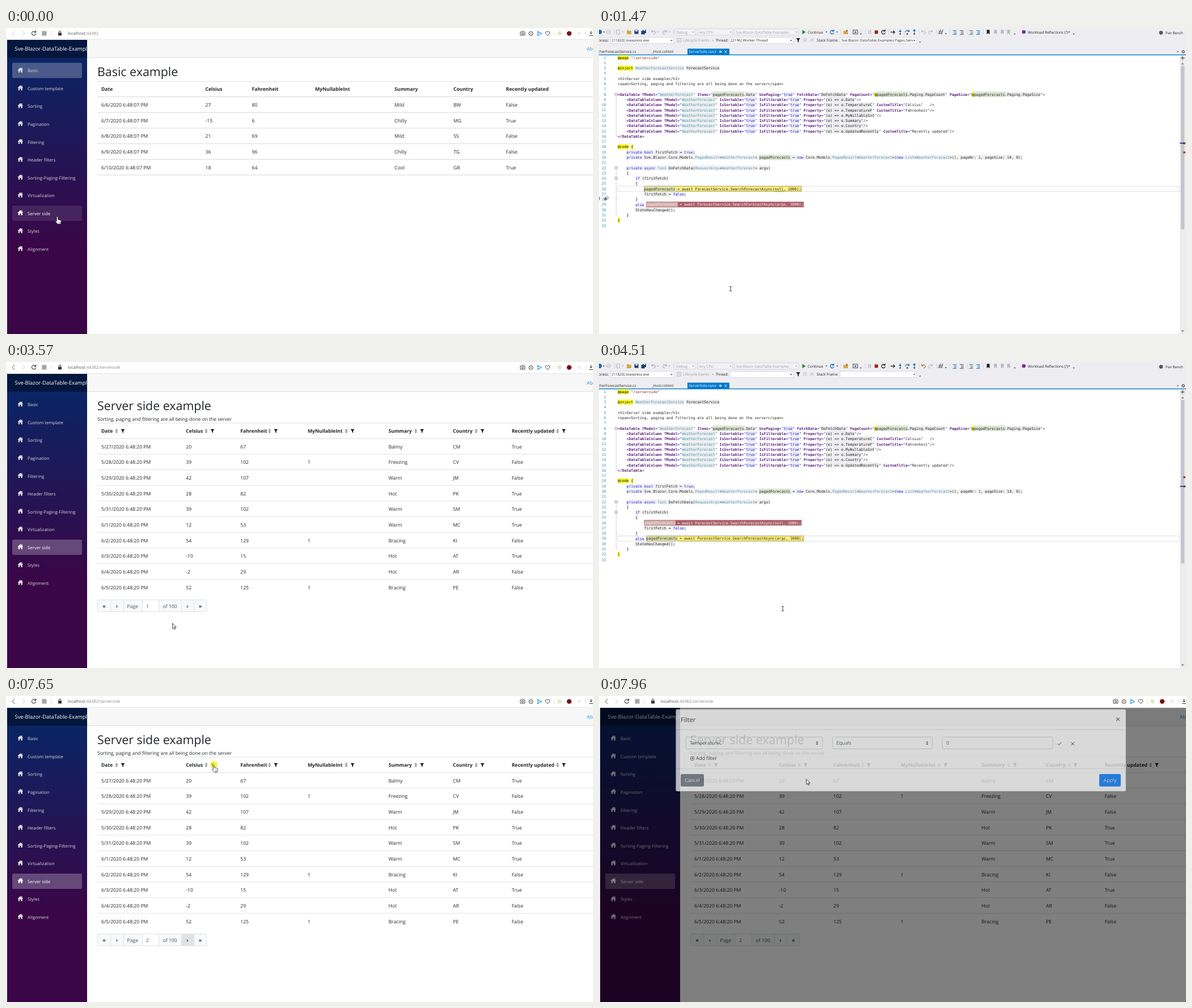
Write an HTML page that moves like this. It is 1035 by 541 pixels and loops after 8 s.

```html
<!DOCTYPE html>
<html lang="en">
<head>
<meta charset="utf-8">
<title>Server side data table</title>
<style>
html, body { margin: 0; width: 100%; height: 100%; overflow: hidden; background: #fff; }
svg { display: block; width: 100vw; height: 100vh; }
text { font-family: "Open Sans", "Noto Sans", sans-serif; white-space: pre; text-rendering: geometricPrecision; }
.mono { font-family: "DejaVu Sans Mono", "Noto Sans Mono", monospace; }
.line { fill: none; stroke-linecap: round; stroke-linejoin: round; }
</style>
</head>
<body>
<svg id="stage" viewBox="0 0 1035 541" preserveAspectRatio="none"></svg>
<script>
const LOOP = 8000;
const INK = '#212529';
const range = n => [...Array(n).keys()];

// Drawing helpers; text is placed by its left edge and the middle of its capitals.
const text = (x, y, s, size = 8.6, fill = INK, extra = '') =>
  `<text x="${x}" y="${y + size * .36}" font-size="${size}" fill="${fill}" ${extra}>${s}</text>`;
const rect = (x, y, w, h, fill, extra = '') =>
  `<rect x="${x}" y="${y}" width="${w}" height="${h}" fill="${fill}" ${extra}/>`;
const dot = (x, y, r, fill, extra = '') => `<circle cx="${x}" cy="${y}" r="${r}" fill="${fill}" ${extra}/>`;
const shape = (d, fill, extra = '') => `<path d="${d}" fill="${fill}" ${extra}/>`;
const line = (d, stroke = '#333', width = 1) =>
  `<path class="line" d="${d}" stroke="${stroke}" stroke-width="${width}"/>`;
const when = (spans, body) => `<g data-on="${spans}">${body}</g>`;
const escape = s => s.replace(/&/g, '&amp;').replace(/</g, '&lt;').replace(/>/g, '&gt;');
const caretDown = (x, y, fill = '#444') => shape(`M${x - 1.7} ${y - .8}h3.4l-1.7 2z`, fill);

// ---------- Browser ----------
const BASIC = '0-620';
const SERVER = '2800-4200 6380-8000';

function browserBar() {
  const back = 'M15 5.5l-4 4 4 4';
  return rect(0, 0, 1035, 21, '#fff') + rect(0, 20, 1035, 1, '#e3e5e8') +
    when(BASIC, line(back, '#c4c4c4')) + when(SERVER, line(back, '#444')) +
    line('M29 5.5l4 4-4 4', '#c4c4c4') +
    line('M52 7.2a3.6 3.6 0 1 0 .6 3M52.6 5v2.6h-2.7', '#333', 1.1) +
    [[64, 6], [68, 6], [64, 10], [68, 10]].map(([x, y]) => rect(x, y, 2.8, 2.8, 'none', 'stroke="#555" stroke-width=".8"')).join('') +
    rect(79.5, 5, 1, 9, '#ddd') + rect(92, 8.5, 6, 4.8, '#333') + line('M93.3 8.5v-1.5a1.7 1.7 0 0 1 3.4 0v1.5', '#333') +
    when(BASIC, text(109, 9.8, 'localhost<tspan fill="#888">:44382</tspan>', 7.4, '#555')) +
    when(SERVER, text(109, 9.8, 'localhost<tspan fill="#888">:44382/serverside</tspan>', 7.4, '#555')) +
    line('M907.3 7h2l.8-1.3h2l.8 1.3h2v5.8h-7.6z', '#444') + dot(911, 9.8, 1.5, 'none', 'stroke="#444"') +
    dot(925.5, 9.8, 3.6, 'none', 'stroke="#444"') + line('M924.2 8.5l2.6 2.6m0-2.6l-2.6 2.6', '#444', .8) +
    line('M937 6l7.5 3.7-7.5 3.7 1.4-3.7z', '#2196e8', 1.1) +
    line('M955 13.3l-3.5-3.6a2 2 0 0 1 3.5-2.5 2 2 0 0 1 3.5 2.5z', '#444') +
    rect(966, 5, 1, 9, '#e2e2e2') + dot(976, 9.6, 3.8, '#d9efc8') + dot(993, 9.6, 4.2, '#7d0d1a') +
    dot(1011, 9.6, 3.2, '#eeeeee') + rect(1022, 5, 1, 9, '#e2e2e2') +
    line('M1031.5 5.5v5m-2-2l2 2 2-2M1028.5 13.3h7', '#333');
}

const NAV = ['Basic', 'Custom template', 'Sorting', 'Pagination', 'Filtering', 'Header filters',
  'Sorting-Paging-Filtering', 'Virtualization', 'Server side', 'Styles', 'Alignment'];
const NAV_STEP = 31.55;

function sidebar() {
  const mark = (row, alpha) => rect(11, 61.5 + row * NAV_STEP, 123, 27, '#fff', `fill-opacity="${alpha}" rx="2.2"`);
  const items = NAV.map((label, i) => {
    const y = 75.3 + i * NAV_STEP;
    const color = label === 'Server side' ? '#fff' : '#d7d7d7';
    return shape(`M20.3 ${y - .8}l5-4.8 2 1.9v-1.4h1.4v2.7l1.6 1.6h-1.4v4.2h-2.4v-3h-2.3v3h-2.4v-4.2z`, color) +
      text(38, y + .2, label, 7.8, color);
  }).join('');
  return rect(0, 21, 2, 520, '#eceef2') + rect(2, 21, 141, 520, 'url(#night)') +
    rect(2, 21, 141, 31.5, '#000', 'fill-opacity=".4"') +
    `<g clip-path="url(#side)">${text(15.5, 37, 'Sve-Blazor-DataTable-Examples', 9.4, '#fff')}</g>` +
    when(BASIC, mark(0, .25) + mark(8, .1)) + when(SERVER, mark(8, .25)) + items;
}

const rule = (y, color, h = 1) => rect(161, y, 874, h, color);
const cells = (xs, y, values) => values.map((v, i) => v === '-' ? '' : text(xs[i], y, v)).join('');
const bold = (x, y, s) => text(x, y, s, 8.6, INK, 'font-weight="700"');
const HEADS = ['Date', 'Celsius', 'Fahrenheit', 'MyNullableInt', 'Summary', 'Country', 'Recently updated'];
const title = s => text(161, 77.3, s, 21.4, INK, 'font-weight="500"');
const ROW = 27.65;

function basicPage() {
  const xs = [168, 351.5, 433.5, 545, 685, 789, 881.5];
  const rows = ['6/6 27 80 - Mild BW False', '6/7 -15 6 - Chilly MG True', '6/8 21 69 - Mild SS False',
    '6/9 36 96 - Chilly TG False', '6/10 18 64 - Cool GR True'];
  return title('Basic example') + rule(94, '#dee2e6') + HEADS.map((h, i) => bold(xs[i], 108, h)).join('') +
    rows.map((r, i) => {
      const [day, ...rest] = r.split(' ');
      return rule(121.2 + i * ROW, '#d3d8dd') + cells(xs, 136 + i * ROW, [`${day}/2020 6:48:07 PM`, ...rest]);
    }).join('') + rule(259.4, '#d3d8dd');
}

function serverPage() {
  const xs = [168, 317.3, 413.3, 532, 674.5, 788, 891.7];
  const sortXs = [195, 353, 464.7, 600, 722.5, 829, 972.5];
  const rows = ['5/27 20 67 - Balmy CM True', '5/28 39 102 1 Freezing CV False', '5/29 42 107 - Warm JM False',
    '5/30 28 82 - Hot PK True', '5/31 39 102 - Warm SM True', '6/1 12 53 - Warm MC True',
    '6/2 54 129 1 Bracing KI False', '6/3 -10 15 - Hot AT True', '6/4 -2 29 - Hot AR False', '6/5 52 125 1 Bracing PE False'];
  const heads = HEADS.map((h, i) => {
    const x = sortXs[i];
    return bold(xs[i], 121.8, h) +
      shape(`M${x - 2.6} 121.2h5.2l-2.6-2.8zM${x - 2.6} 122.8h5.2l-2.6 2.8z`, '#777') +
      shape(`M${x + 7.5} 118.8h7l-2.6 3.2v3.6l-1.8-1.3v-2.3z`, '#111');
  }).join('');
  return title('Server side example') + text(161, 101.2, 'Sorting, paging and filtering are all being done on the server', 8.5) +
    rule(107.5, '#dee2e6') + heads +
    rows.map((r, i) => {
      const [day, ...rest] = r.split(' ');
      return rule(134.8 + i * ROW, '#dee2e6', i ? 1 : 1.2) + cells(xs, 149.6 + i * ROW, [`${day}/2020 6:48:20 PM`, ...rest]);
    }).join('') + pager();
}

function pager() {
  const edges = [184, 207, 240, 269, 309, 331];
  const pick = (x, s) => text(x, 431.6, s, 10, INK, 'text-anchor="middle" font-weight="600"');
  return rect(161.5, 420.5, 192, 21, '#f8f9fa', 'stroke="#dee2e6" rx="2"') + rect(240, 421, 29, 20, '#fff') +
    when('3880-4200 6380-7730', rect(309, 421, 22, 20, '#dfe3e8')) +
    edges.map(x => rect(x, 421, 1, 20, '#dee2e6')).join('') +
    pick(173, '«') + pick(195.5, '‹') + pick(320, '›') + pick(342.5, '»') +
    text(213.5, 431.8, 'Page', 8.6, '#495057') + text(276.5, 431.8, 'of 100', 8.6, '#495057') +
    when('2800-4200', text(247, 431.8, '1', 8.6, '#495057')) + when('6380-8000', text(247, 431.8, '2', 8.6, '#495057'));
}

function modal() {
  const field = (x, w, s, select) => rect(x, 72.5, w, 21, '#fff', 'stroke="#ced4da" rx="2"') +
    text(x + 7, 83.3, s, 8.6, '#495057') +
    (select ? shape(`M${x + w - 11.5} 82.5h4l-2-2.4zM${x + w - 11.5} 84h4l-2 2.4z`, '#343a40') : '');
  const button = (x, w, s, fill) => rect(x, 138, w, 22, fill, 'rx="2.2"') +
    text(x + w / 2, 149.2, s, 8.6, '#fff', 'text-anchor="middle"');
  return rect(135.5, 23.5, 793.5, 145, '#fff', 'stroke="#888" stroke-opacity=".4" rx="2.5"') +
    text(144, 41.5, 'Filter', 11.2, INK, 'font-weight="500"') + line('M912.7 38.6l4.6 4.6m0-4.6l-4.6 4.6', '#555', 1.3) +
    rect(136, 59, 793, 1, '#dee2e6') + rect(136, 128, 793, 1, '#dee2e6') +
    field(153, 241, 'TemperatureC', true) + field(411.5, 176.5, 'Equals', true) + field(605.5, 194.5, '0') +
    line('M809 84.5l2 2 4.2-4.5', '#222') + line('M832.7 82l5 5m0-5l-5 5', '#222') +
    dot(164.5, 110.5, 3.4, 'none', 'stroke="#333" stroke-width=".8"') + line('M163 110.5h3m-1.5-1.5v3', '#333', .8) +
    text(171, 109.8, 'Add filter') + button(144, 41, 'Cancel', '#6c757d') + button(882, 38, 'Apply', '#007bff');
}

const browser = () => rect(0, 0, 1035, 541, '#fff') + sidebar() +
  rect(143, 21, 892, 31.5, '#f7f7f7') + rect(143, 51.8, 892, .8, '#d6d5d5') + text(1024, 37, 'About', 8.6, '#2b8fe0') +
  when(BASIC, basicPage()) + when(SERVER, serverPage()) +
  rect(2, 21, 1033, 520, '#000', 'id="backdrop"') + `<g id="modal">${modal()}</g>` + browserBar();

// ---------- Code editor ----------
const CHAR = 3.902, LEFT = 33, LEADING = 9.28;
const column = c => LEFT + c * CHAR;
const rowY = n => 52.3 + (n - 1) * LEADING;
const STOPPED = '1160-2410 4590-6080';

const col = (property, rest = '') =>
  `    <DataTableColumn TModel="WeatherForecast" IsSortable="true" IsFilterable="true" Property="(e) => e.${property}"${rest}/>`;
const CODE = `@page "/serverside"

@inject WeatherForecastService ForecastService

<h1>Server side example</h1>
<span>Sorting, paging and filtering are all being done on the server</span>

<DataTable TModel="WeatherForecast" Items="pagedForecasts.Data" UsePaging="true" FetchData="DoFetchData" PageCount="@pagedForecasts.Paging.PageCount" PageSize="@pagedForecasts.Paging.PageSize">
${col('Date')}
${col('TemperatureC', ' CustomTitle="Celsius"   ')}
${col('TemperatureF', ' CustomTitle="Fahrenheit"')}
${col('MyNullableInt')}
${col('Summary')}
${col('Country')}
${col('UpdatedRecently', ' CustomTitle="Recently updated"')}
</DataTable>

@code {
    private bool firstFetch = true;
    private Sve.Blazor.Core.Models.PagedResult<WeatherForecast> pagedForecasts = new Core.Models.PagedResult<WeatherForecast>(new List<WeatherForecast>(), pageNr: 1, pageSize: 10, 0);

    private async Task DoFetchData(RequestArgs<WeatherForecast> args)
    {
        if (firstFetch)
        {

            firstFetch = false;
        }
        else
        StateHasChanged();
    }
}
`.split('\n');

const TOKENS = /(?<at>@(?:page\b|inject|code)?|^}$|(?<=@code ){)|(?<path>"\/serverside")|(?<tag><\/?DataTable(?:Column)?)|(?<attr>\w+(?==")|Property)|(?<type>\b(?:WeatherForecastService|WeatherForecast|RequestArgs|PagedResult|List|Task)\b)|(?<key>\b(?:private|bool|true|false|async|await|new|if|else|null)\b|="|")/g;
const COLORS = { at: '#000', path: '#a31515', tag: '#5a1a78', attr: '#5a1a78', type: '#4a9ab0', key: '#1a1ae6', plain: '#222' };

function codeRow(source, n) {
  let shade = '', spans = '', from = 0;
  const box = (start, length, fill) => { shade += rect(column(start), rowY(n) - 4.4, length * CHAR, 8.8, fill); };
  const emit = (s, start, kind) => {
    const trimmed = s.trimStart();
    const weight = kind === 'tag' || kind === 'attr' ? 'font-weight="700"' : '';
    if (trimmed) spans += `<tspan x="${column(start + s.length - trimmed.length)}" fill="${COLORS[kind]}" ${weight}>${escape(trimmed)}</tspan>`;
  };
  if (n > 18 && n < 32) box(source.search(/\S|$/), source.trim().length, '#f1f1f2');
  if (n > 7 && n < 16) for (const m of source.matchAll(/(?<!CustomTitle)="([^"]*)"/g)) box(m.index + 2, m[1].length, '#ececee');
  if (n === 3) { box(8, 22, '#ececee'); box(31, 15, '#ececee'); }
  for (const m of source.matchAll(TOKENS)) {
    const kind = Object.keys(m.groups).find(k => m.groups[k] !== undefined);
    emit(source.slice(from, m.index), from, 'plain');
    if (kind === 'at') box(m.index, m[0].length, '#ffff2a');
    emit(m[0], m.index, kind);
    from = m.index + m[0].length;
  }
  emit(source.slice(from), from, 'plain');
  const refs = [...source.matchAll(/pagedForecasts/g)].map(m =>
    rect(column(m.index), rowY(n) - 4.4, 14 * CHAR, 8.8, '#dfe8d3', 'stroke="#c5d0b8" stroke-width=".5"')).join('');
  return shade + when('1230-2800 4200-6380', refs) + `<text class="mono" font-size="6.48" y="${rowY(n) + 2.4}">${spans}</text>`;
}

// A statement with a breakpoint, in one of its highlight states.
function statement(n, start, arg, back, ink, refBack, refInk, border) {
  const name = 'pagedForecasts';
  const rest = ` = await ForecastService.SearchForecastAsync(${arg}, 1000);`;
  const x = column(start), y = rowY(n), w = (name.length + rest.length) * CHAR;
  return rect(x, y - 4.5, w, 9, back, `stroke="${border}" stroke-width=".8"`) +
    rect(x + .4, y - 4.1, 14 * CHAR, 8.2, refBack) +
    text(x, y, name, 6.48, refInk, 'class="mono"') + text(x + 14 * CHAR, y, rest, 6.48, ink, 'class="mono"');
}
const RED = ['#ab5f69', '#fff', '#cfafaa', '#f2e9e6', '#ab5f69'];
const VIOLET = ['#9f4f61', '#fff', '#cfafaa', '#f2e9e6', '#76508c'];
const YELLOW = ['#fff07a', '#222', '#dfe3ae', '#222', '#8f8a4a'];

const currentRow = n => rect(LEFT, rowY(n) - 4.6, 990, 9.2, 'none', 'stroke="#dfdfe8"');

function statements() {
  const first = skin => statement(26, 12, 'null', ...skin);
  const second = skin => statement(29, 13, 'args', ...skin);
  return when('620-4500', currentRow(26)) + when('4510-6380', currentRow(29)) +
    when('620-700 1700-2800 4200-6380', first(RED)) +
    when('700-1700', first(YELLOW) + line('M310 289.2q1-1.2 2 0t2 0 2 0 2 0 2 0 2 0 2 0 2 0', '#3a9a3a', .6)) +
    when('620-2800 4200-4510', second(RED)) + when('4510-5450', second(YELLOW)) + when('5450-6380', second(VIOLET)) +
    when('4750-5290 5530-5840', rect(84, 307.4, .8, 9, '#222'));
}

function toolbar() {
  const label = (x, y, s, fill = '#222') => text(x, y, s, 6.4, fill);
  const combo = (x, y, w, s, fill = '#222', back = '#fff') => rect(x, y - 5.5, w, 11, back, 'stroke="#cfd0da" stroke-width=".8"') +
    label(x + 2.5, y, s, fill) + caretDown(x + w - 4, y, fill);
  const seps = [27, 88, 131, 426, 469, 510, 564, 595, 618, 649, 677].map(x => rect(x, 3, .7, 9, '#ccccd6')).join('');
  const lines = (x, color = '#444') => line(`M${x - 3} 4.5h6m-4 2.5h4m-4 2.5h4m-6 2h6`, color, .9);
  const bookmark = (x, fill) => shape(`M${x - 2.3} 3.3h5v8l-2.5-2.2-2.5 2.2z`, fill);
  const steps = line('M514.5 7.4h7m-2.5-2.5l2.5 2.5-2.5 2.5', '#222', 1.2) +
    line('M531 3v4.2m-1.8-1.6l1.8 1.8 1.8-1.8M540 7q3.5-5.5 6.6-.8m.2-2.3v2.6h-2.5M556 8V3.2m-1.8 1.6l1.8-1.8 1.8 1.8', '#1766ad', 1.1) +
    [531, 543.5, 556].map(x => dot(x, 10.4, 1.2, '#222')).join('');
  const undo = (x, color) => line(`M${x - 3} 4v3h3m-3 0q3-4 5.5-1t-2 5`, color, 1.1);
  const redo = (x, color) => line(`M${x + 3} 4v3h-3m3 0q-3-4-5.5-1t2 5`, color, 1.1);
  return rect(0, 0, 1035, 48, '#eeeef2') + seps +
    dot(1, 7, 4, '#1766ad') + caretDown(8.5, 7) + dot(17, 7, 3.3, 'none', 'stroke="#b8b8c0"') + line('M15.3 7h3.4', '#b8b8c0') +
    rect(31, 3.5, 5.5, 7, 'none', 'stroke="#b8b8c0"') + caretDown(42, 7, '#aaa') +
    shape('M49 4h3l1 1h4v6h-8z', '#d9a648') + rect(62.5, 3.5, 7, 7, '#1c3f75') + rect(64, 3.7, 4, 2.4, '#eeeef2') +
    rect(74.5, 5, 6.3, 6.3, '#1c3f75') + rect(77, 3, 6, 6, '#1c3f75') + rect(78.5, 3, 3, 2, '#eeeef2') +
    undo(96, '#a9a9b4') + caretDown(104, 7, '#aaa') + redo(116, '#a9a9b4') + caretDown(124, 7, '#aaa') +
    combo(134, 7.3, 36, 'Debug', '#9c9ca6', '#f3f3f6') + combo(174, 7.3, 62, 'Any CPU', '#9c9ca6', '#f3f3f6') +
    combo(239, 7.3, 113, 'Sve-Blazor-DataTable-Examples', '#9c9ca6', '#f3f3f6') +
    shape('M358.5 3.3l6 4-6 4z', '#2f8a3a') + label(368, 7.4, 'Continue') + caretDown(401, 7) +
    line('M413.6 5.4a3.2 3.2 0 1 0 .5 3M414 3v2.7h-2.6', '#1766ad', 1.2) + caretDown(420, 7) +
    shape('M431 5h3l1 1h4v5h-8z', '#d9a648') + dot(437, 4.8, 1.6, '#8c6a2c') +
    rect(448, 3.8, 8, 6.6, 'none', 'stroke="#444"') + dot(452, 7.2, 1.5, '#1766ad') + caretDown(461.5, 10.5) +
    rect(475, 4, 1.5, 6.5, '#b8b8c0') + rect(478, 4, 1.5, 6.5, '#b8b8c0') + rect(486, 4.3, 6, 6, '#a1260d') +
    line('M504 5.4a3.2 3.2 0 1 0 .5 3M504.5 3v2.7h-2.6', '#222', 1.2) +
    `<g opacity=".35">${steps}</g>` + when('620-2410 4510-6080', steps) +
    when('620-2800', undo(572, '#b8b8c0')) + when('4200-6380', undo(572, '#b4602c')) + redo(584.5, '#b8b8c0') +
    line('M600 11l2-8m2 8l2-8m-7 3h7m-8 3h7', '#444', .9) + caretDown(611.5, 10) +
    lines(627, '#1766ad') + lines(639.5) + lines(656, '#2f7a5a') + lines(668.5, '#1766ad') +
    bookmark(686, '#222') + [699, 711, 722].map(x => bookmark(x, '#b8b8c0')).join('') + caretDown(733, 10.5) +
    dot(749, 7, 3.3, '#7a2f96') + label(756, 7.4, 'Workload Reflections (?)') + caretDown(829, 7) + caretDown(837, 10.5) +
    dot(991, 8.4, 3.3, '#555') + text(999, 8.6, 'Pair Bench', 6.2, '#222') +
    label(-1, 22, 'ocess:') + combo(20.5, 22, 111.5, '[11820] iisexpress.exe') +
    rect(138, 18.5, 6.5, 6.5, 'none', 'stroke="#b8b8c0"') + line('M141 20v3l-1.2-1m1.2 1l1.2-1', '#b8b8c0', .8) +
    label(148, 22, 'Lifecycle Events', '#9c9ca6') + caretDown(200.5, 22, '#aaa') + label(205.5, 22, 'Thread:') +
    combo(231, 22, 111.5, '') + when(STOPPED, label(233, 22, '[2196] Worker Thread')) +
    shape('M347.5 18h7.5l-2.8 3.6v4l-2-1.4v-2.6z', '#222') + line('M361 25v-6h5l-2 2 2 2h-5M372 24l3-5 3 5m-4-1l5-4', '#b8b8c0', .9) +
    label(384, 22, 'Stack Frame:') + combo(425, 22, 135, '') +
    when(STOPPED, label(427.5, 22, 'Sve.Blazor.DataTable.Examples.Pages.Serv')) + caretDown(566, 25) +
    label(-1, 42, 'therForecastService.cs') + label(93, 42, '_Host.cshtml') +
    rect(156, 36.5, 74, 11, '#007acc') + label(158.5, 42, 'ServerSide.razor', '#fff') +
    line('M211.5 42h2m0-1.8v3.6m0-2.8h2.4v2h-2.4', '#fff', .8) + line('M221.5 40.2l3.6 3.6m0-3.6l-3.6 3.6', '#fff', .9) +
    caretDown(1020.5, 42) + dot(1030, 42, 2, 'none', 'stroke="#555" stroke-width="1.3"') + rect(0, 46.8, 1035, 1.4, '#007acc');
}

function scrollbar() {
  const marks = (caretY, dark) => rect(1030, 202, 4, 3.4, '#b03a3a') + rect(1030, 218.4, 4, 3.2, '#b03a3a') +
    rect(1024, caretY, 10, 1.6, dark);
  return rect(1024, 48.5, 11, 492.5, '#ececf0') + rect(1026, 67, 6.2, 289, '#c4c5cc') +
    line('M1029 50v6m-3-3h6', '#333') + shape('M1026.5 64.5h5l-2.5-3z', '#777') + shape('M1026.5 534.5h5l-2.5 3z', '#777') +
    when('620-4500', marks(202.8, '#1b1b78') + rect(1031.5, 202, 2.5, 3.4, '#2c7a3d')) + when('4510-6380', marks(219, '#4a2a8a'));
}

function editor() {
  const fold = n => rect(28, rowY(n) - 2.3, 4.6, 4.6, '#fff', 'stroke="#a5a5a5" stroke-width=".7"') + line(`M29 ${rowY(n)}h2.6`, '#555', .7);
  return rect(0, 0, 1035, 541, '#fff') + toolbar() + scrollbar() +
    range(33).map(i => text(12.5, rowY(i + 1), i + 1, 6.48, '#2b91af', 'class="mono" text-anchor="end"')).join('') +
    line(`M30.3 ${rowY(8)}V${rowY(16)}h2M30.3 ${rowY(18)}M30.3 ${rowY(22)}V${rowY(31)}h2M30.3 ${rowY(28)}h2`, '#c2c2c2', .7) +
    [8, 22, 24].map(fold).join('') + CODE.map((s, i) => codeRow(s, i + 1)).join('') + statements() +
    when('1470-1620 1940-2100', line('M0 298.5q2.6 3 0 6', '#333') + dot(11.6, 302, 2.8, '#777') +
      dot(14.5, 299.8, 2, '#fff', 'stroke="#555" stroke-width=".8"'));
}

// ---------- Pointer ----------
const POINTERS = {
  hand: shape('M-1.2 1q1.2-2 2.4 0v4.2l4.2 1q1.6.5 1.3 2.4l-1 4.6h-5.2l-3.6-4.4q.3-1.7 1.9-.6z', '#fff', 'stroke="#222" stroke-width=".8"') +
    line('M2.5 9.5v2m1.6-2v2', '#222', .5),
  arrow: shape('M0 0v9.3l2.1-1.9 1.5 3.3 1.5-.7-1.5-3.2h3z', '#fff', 'stroke="#111" stroke-width=".8"'),
  beam: line('M-1.8-4h1.3l.5.5.5-.5h1.3M0-3.5v7M-1.8 4h1.3l.5-.5.5.5h1.3', '#222', .9)
};
// Time, position and the pointer used from that time on.
const PATH = [
  [0, 90.5, 333.5, 'hand'], [460, 90.5, 333.5, 'hand'], [620, 130, 372, 'beam'], [850, 205, 440, 'beam'], [1310, 232, 461, 'beam'],
  [2100, 232, 461, 'beam'], [2260, 234, 466, 'beam'], [2560, 237, 461, 'arrow'], [2800, 237, 461, 'arrow'],
  [2960, 290, 504, 'arrow'], [3270, 290, 504, 'arrow'], [3420, 273, 474, 'arrow'], [3570, 293.5, 462, 'arrow'],
  [3800, 318, 440, 'hand'], [3880, 320, 432, 'hand'], [4200, 324, 436, 'beam'], [6380, 320, 432, 'hand'], [6700, 320, 432, 'hand'],
  [6780, 326, 408, 'arrow'], [7100, 362, 240, 'arrow'], [7330, 374, 140, 'arrow'], [7490, 366.5, 121.5, 'hand'],
  [7730, 366.5, 121.5, 'arrow'], [7880, 366.5, 121.5, 'arrow'], [7960, 365.5, 147, 'arrow'], [LOOP, 365.5, 147, 'arrow']
];
const CLICKS = '300-460 4040-4120 7570-7730';

const stage = document.getElementById('stage');
stage.innerHTML = `<defs>
  <linearGradient id="night" x1="0" y1="0" x2="0" y2="1"><stop stop-color="#052767"/><stop offset=".7" stop-color="#3a0647"/></linearGradient>
  <clipPath id="side">${rect(2, 21, 141, 32, '#000')}</clipPath></defs>` +
  when(`${BASIC} ${SERVER}`, browser()) + when('620-2800 4200-6380', editor()) +
  `<g id="pointer">${when(CLICKS, dot(0, 0, 6.6, '#fdf22b', 'fill-opacity=".8"'))}` +
  Object.entries(POINTERS).map(([kind, body]) => `<g data-kind="${kind}">${body}</g>`).join('') + '</g>';

const timed = [...stage.querySelectorAll('[data-on]')].map(node => ({
  node, spans: node.dataset.on.split(' ').map(s => s.split('-').map(Number))
}));
const kinds = stage.querySelectorAll('[data-kind]');
const [pointer, backdrop, dialog] = ['pointer', 'backdrop', 'modal'].map(id => document.getElementById(id));
const clamp = v => Math.max(0, Math.min(1, v));
const show = (node, on) => { node.style.display = on ? '' : 'none'; };

function render(t) {
  for (const { node, spans } of timed) show(node, spans.some(([a, b]) => t >= a && t < b));

  const i = PATH.findIndex(([end]) => end > t);
  const [t0, x0, y0, kind] = PATH[i - 1], [t1, x1, y1, next] = PATH[i];
  const steady = kind === next || (kind !== 'beam' && next !== 'beam');
  const k = steady ? (t - t0) / (t1 - t0) : 0;
  pointer.setAttribute('transform', `translate(${x0 + (x1 - x0) * k} ${y0 + (y1 - y0) * k})`);
  for (const node of kinds) show(node, node.dataset.kind === kind);

  backdrop.setAttribute('opacity', t < 7730 ? 0 : .5 * clamp((t - 7690) / 145));
  const enter = clamp((t - 7880) / 80);
  show(dialog, t >= 7880);
  dialog.setAttribute('opacity', .2 + .5 * enter);
  dialog.setAttribute('transform', `translate(0 ${-9 * (1 - enter)})`);
}

function tick() {
  render(performance.now() % LOOP);
  requestAnimationFrame(tick);
}
tick();
</script>
</body>
</html>
```
